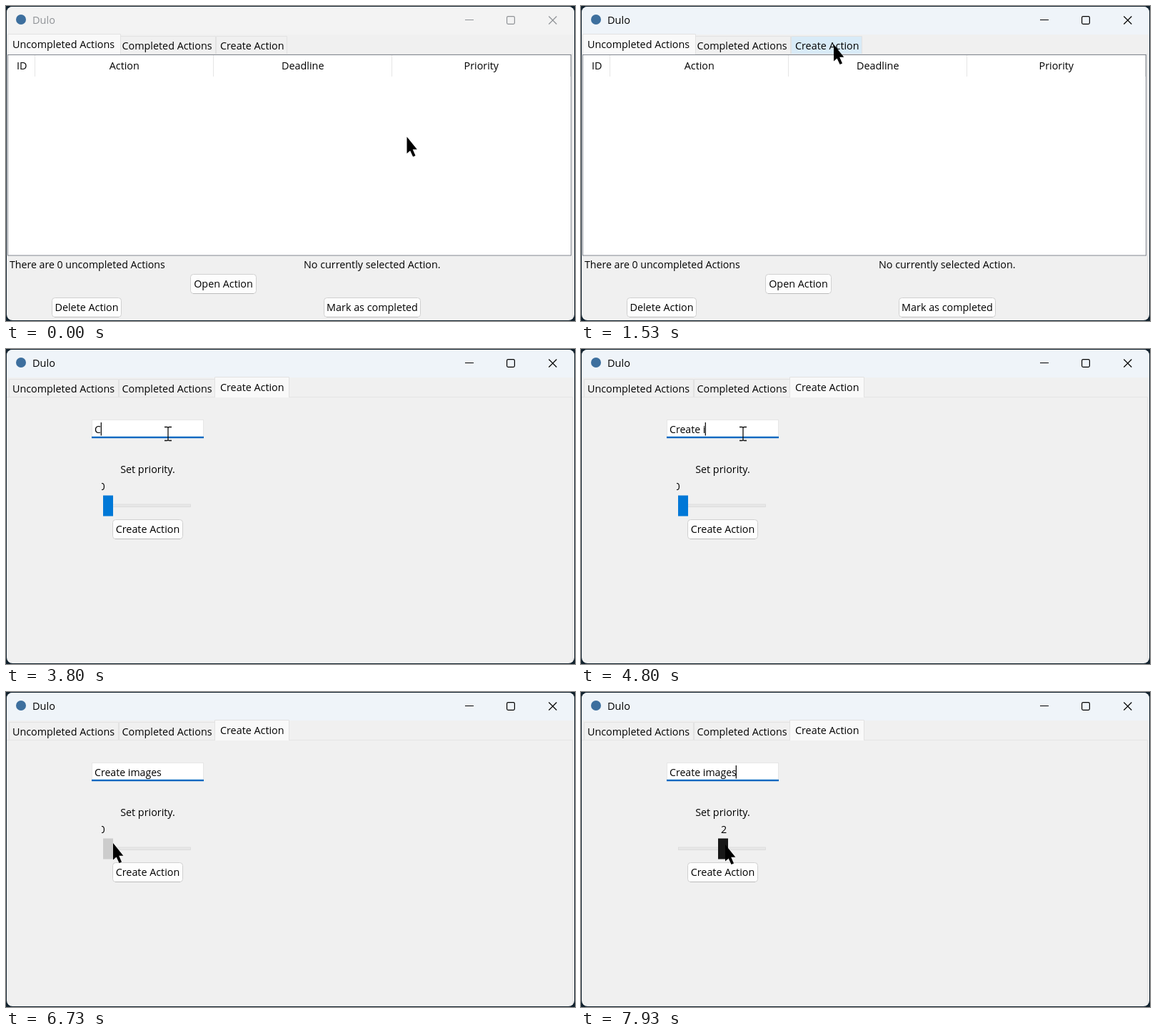
Recreate the animation shown at these times as an HTML page. Size 797 px wide and 442 px high, loop 8000 ms.

```html
<!DOCTYPE html>
<html lang="en">
<head>
<meta charset="utf-8">
<title>Dulo</title>
<style>
  html, body { margin: 0; width: 100%; height: 100%; overflow: hidden; background: #12222e; }
  svg { display: block; width: 797px; height: 442px; }
  text { font: 14.35px "Open Sans", "Noto Sans", sans-serif; fill: #000; white-space: pre; }
  .mid { text-anchor: middle; }
</style>
</head>
<body>
<svg id="stage" viewBox="0 0 797 442" xmlns="http://www.w3.org/2000/svg">
  <defs>
    <clipPath id="win"><rect x="1" y="1" width="795" height="440" rx="8"/></clipPath>
    <clipPath id="scaleClip"><rect x="134" y="180" width="127" height="25"/></clipPath>
  </defs>
  <g clip-path="url(#win)">
    <rect width="797" height="442" fill="#f0f0f0"/>
    <rect id="bar" width="797" height="40"/>
    <circle cx="21" cy="19" r="7" fill="#3d6f9e"/>
    <text id="title" x="37" y="25" style="font-size:14.5px">Dulo</text>
    <g id="controls" fill="none" stroke-width="1.2">
      <path d="M643 19.5h12"/>
      <rect x="701.6" y="14.6" width="10.8" height="10.8" rx="1.8"/>
      <path d="M760.3 14.5l11 11M771.3 14.5l-11 11"/>
    </g>
    <path d="M1 67.5H793.5V440" fill="none" stroke="#e4e4e4"/>
    <g id="tabs"></g>

    <g id="listPage">
      <rect x="2.5" y="68.5" width="789" height="281.5" fill="#fff" stroke="#828790"/>
      <g id="columns"></g>
      <text x="5" y="368" style="font-size:14.15px">There are 0 uncompleted Actions</text>
      <text x="417" y="368">No currently selected Action.</text>
    </g>

    <g id="formPage">
      <rect x="120.5" y="99.5" width="156" height="25" fill="#fff" stroke="#e6e6e6"/>
      <rect x="120" y="122.8" width="157" height="2.4" fill="#0067c0"/>
      <text id="entry" x="124" y="118" style="font-size:14.15px"></text>
      <rect id="caret" y="103" width="1.2" height="18.5" fill="#000"/>
      <text class="mid" x="198.5" y="174">Set priority.</text>
      <g clip-path="url(#scaleClip)"><text id="value" class="mid" y="198"></text></g>
      <rect x="136.5" y="218" width="122" height="3.5" fill="#e7e7e7" stroke="#d9d9d9" stroke-width=".8"/>
      <rect id="thumb" y="205.5" width="14" height="29"/>
    </g>
  </g>
  <path id="arrow" d="M0 0V23.5L4.6 19.4L8.6 28L12 26.4L8.2 17.8H14.3Z" fill="#000"/>
  <path id="beam" d="M-5-8.5h3.5q1.5 0 1.5 1.5q0-1.5 1.5-1.5h3.5M0-7V9M-5 10.5h3.5q1.5 0 1.5-1.5q0 1.5 1.5 1.5h3.5" fill="none" stroke="#111" stroke-width="1.3"/>
</svg>
<script>
const LOOP = 8000, FPS = 15;
const ACTIVATE = 330, OPEN_FORM = 1600, PRESS = 6530, DRAG = 6933, RELEASE = 7730;
const HOVER = '#d9ebf7';
const $ = id => document.getElementById(id);

function add(parent, tag, attrs, content = '') {
  const el = document.createElementNS('http://www.w3.org/2000/svg', tag);
  set(el, attrs);
  el.textContent = content;
  parent.appendChild(el);
  return el;
}
function set(el, attrs) {
  for (const k in attrs) el.setAttribute(k, attrs[k]);
}
const show = (el, on) => { el.style.display = on ? '' : 'none'; };
const inside = (p, x0, y0, x1, y1) => p.x >= x0 && p.x < x1 && p.y >= y0 && p.y < y1;

function button(parent, x, y, w, label) {
  add(parent, 'rect', { x: x + .5, y: y + .5, width: w - 1, height: 27, rx: 4, fill: '#fdfdfd', stroke: '#d0d0d0' });
  add(parent, 'path', { d: `M${x + 4} ${y + 27.5}h${w - 8}`, stroke: '#bcbcbc' });
  add(parent, 'text', { x: x + w / 2, y: y + 19, class: 'mid' }, label);
}
button($('listPage'), 258, 376, 93, 'Open Action');
button($('listPage'), 64, 409, 98, 'Delete Action');
button($('listPage'), 445, 409, 136, 'Mark as completed');
button($('formPage'), 149, 239, 99, 'Create Action');

// A hovered header cell covers the separators on both of its sides.
const columns = [['ID', 3, 40], ['Action', 40, 290], ['Deadline', 290, 540], ['Priority', 540, 790]]
  .map(([label, x0, x1]) => {
    add($('columns'), 'path', { d: `M${x1 + .5} 69V99`, stroke: '#e5e5e5' });
    const box = add($('columns'), 'rect', { x: x0, y: 69, width: x1 - x0 + 1, height: 30 });
    add($('columns'), 'text', { x: (x0 + x1) / 2 + .8, y: 89, class: 'mid' }, label);
    return { box, x0, x1 };
  });

const tabs = [['Uncompleted Actions', 9, 4, 158], ['Completed Actions', 162.5, 158, 294], ['Create Action', 300, 294, 394]]
  .map(([label, tx, x0, x1]) => {
    const g = add($('tabs'), 'g', {});
    return {
      x0, x1, g,
      box: add(g, 'path', { stroke: '#e2e2e2' }),
      text: add(g, 'text', { x: tx }, label)
    };
  });

const ease = {
  lin: k => k,
  out: k => 1 - (1 - k) * (1 - k),
  both: k => k * k * (3 - 2 * k)
};
const path = [
  [267, 561.5, 183.5], [1200, 391, 76, 'lin'], [1533, 354, 54, 'out'],
  [1867, 354, 54], [2133, 240, 132, 'both'], [2667, 227, 118, 'out'],
  [5733, 227, 118], [5800, 217, 125, 'lin'], [6533, 150, 212, 'out'],
  [DRAG, 150, 212], [RELEASE, 202, 214, 'both']
];
function mouse(t) {
  const i = path.findIndex(p => p[0] > t);
  if (i === 0) return { x: path[0][1], y: path[0][2] };
  if (i < 0) { const p = path[path.length - 1]; return { x: p[1], y: p[2] }; }
  const a = path[i - 1], b = path[i];
  const k = ease[b[3] || 'lin']((t - a[0]) / (b[0] - a[0]));
  return { x: a[1] + (b[1] - a[1]) * k, y: a[2] + (b[2] - a[2]) * k };
}

const PHRASE = 'Create images';
const keys = [3800, 4000, 4130, 4270, 4330, 4470, 4530, 4800, 4870, 4930, 5070, 5130, 5270];
const caretOff = [[2200, 2530], [3130, 3400], [5870, 6130], [6730, 7000], [7600, 7930]];

function drawTabs(active, p) {
  tabs.forEach((tab, i) => {
    const on = i === active;
    const x0 = tab.x0 - (on ? 1.5 : -.5), x1 = tab.x1 + (on ? 2.5 : -.5);
    const top = on ? 39.5 : 42.5, bottom = on ? 68 : 67;
    const hot = !on && inside(p, tab.x0, 42, tab.x1, 68);
    set(tab.box, { d: `M${x0} ${bottom}V${top}H${x1}V${bottom}`, fill: on ? '#f9f9f9' : hot ? HOVER : '#f0f0f0' });
    set(tab.text, { y: on ? 59 : 61 });
  });
  const front = tabs[active].g;
  if ($('tabs').lastChild !== front) $('tabs').appendChild(front);
}

function drawForm(t, p) {
  const typed = PHRASE.slice(0, keys.filter(k => k <= t).length);
  $('entry').textContent = typed;
  const w = typed ? $('entry').getComputedTextLength() : 0;
  set($('caret'), { x: Math.round(123.6 + w) - .3 });
  show($('caret'), !caretOff.some(([a, b]) => t >= a && t < b));

  const k = (p.x - 150) / 52;
  const drag = t > DRAG + 10 ? Math.min(1, Math.max(0, k)) : 0;
  const x = 136 + 56 * drag;
  const pressed = t >= PRESS && t < RELEASE;
  const hot = inside(p, x - 1, 205, x + 16, 235);
  set($('thumb'), { x, fill: pressed ? '#cccccc' : hot ? '#171717' : '#0078d7' });
  set($('value'), { x: drag ? x + 8 : 134.5 });
  $('value').textContent = Math.floor(drag * 56 / 109 * 4);
}

function draw(ms) {
  const step = Math.floor((ms + 4) * FPS / 1000);
  const t = step * 1000 / FPS + .5;
  const p = mouse(t);
  const form = t >= OPEN_FORM, focused = t >= ACTIVATE;
  const ink = focused ? '#000' : '#8f9296';

  set($('bar'), { fill: focused ? '#eff4f9' : '#f3f3f3' });
  $('title').style.fill = ink;
  set($('controls'), { stroke: ink });
  drawTabs(form ? 2 : 0, p);
  show($('listPage'), !form);
  show($('formPage'), form);
  if (form) drawForm(t, p);
  else for (const c of columns) set(c.box, { fill: inside(p, c.x0, 69, c.x1, 99) ? HOVER : 'none' });

  const overEntry = form && inside(p, 120, 100, 277, 124);
  show($('arrow'), !overEntry);
  show($('beam'), overEntry);
  set($('arrow'), { transform: `translate(${p.x} ${p.y})` });
  set($('beam'), { transform: `translate(${p.x} ${p.y})` });
}

const start = performance.now();
function tick() {
  draw((performance.now() - start) % LOOP);
  requestAnimationFrame(tick);
}
tick();
</script>
</body>
</html>
```
